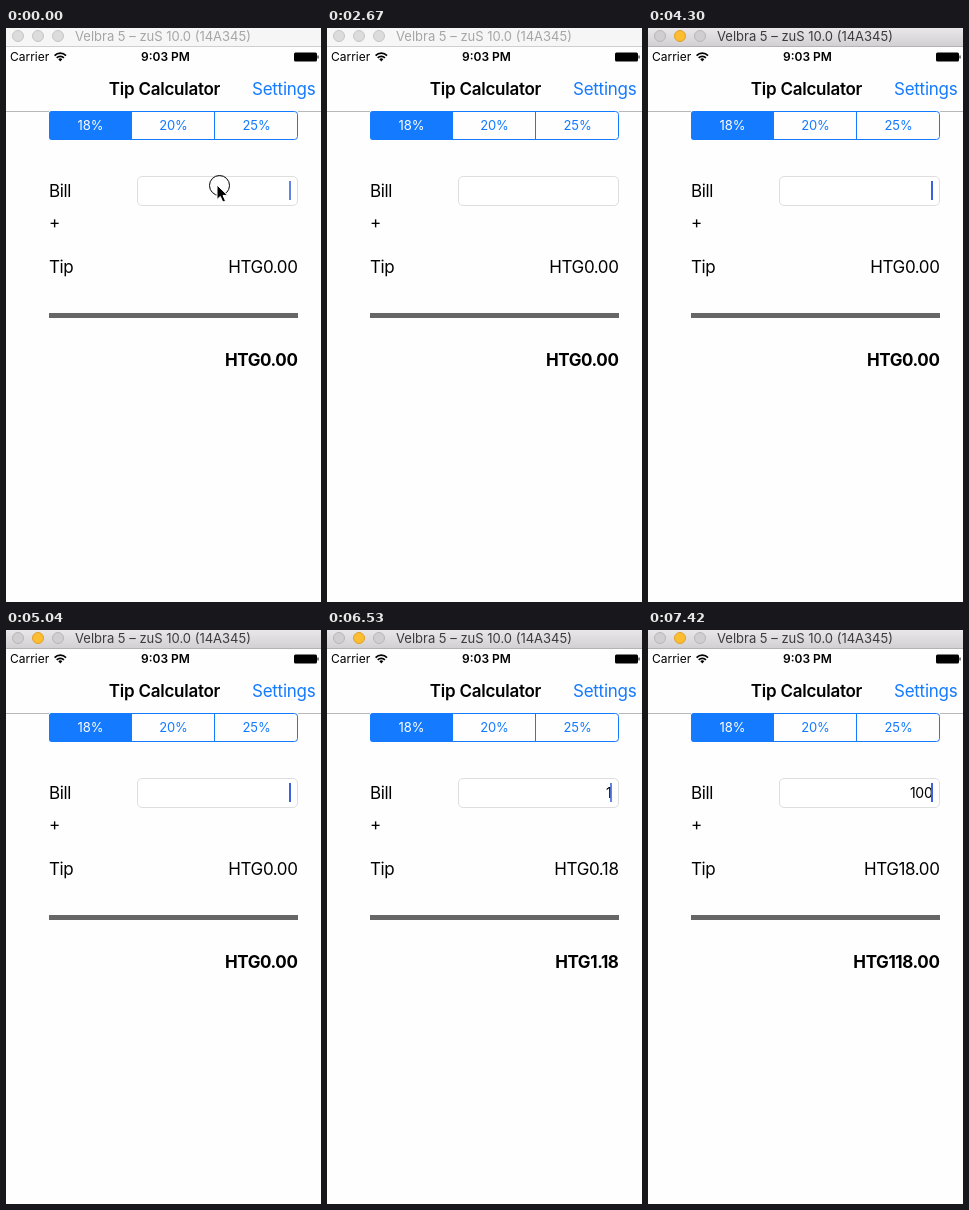
Animation of 315 by 574 pixels, one loop 8000 ms. Source, as an HTML page:

```html
<!DOCTYPE html>
<html lang="en">
<head>
<meta charset="utf-8">
<title>Tip Calculator</title>
<style>
  html, body { margin: 0; width: 100%; height: 100%; overflow: hidden; background: #fefefe; }
  svg { display: block; width: 315px; height: 574px; font: 17px Inter, sans-serif; letter-spacing: -.4px; }
  .end { text-anchor: end; }
  .mid { text-anchor: middle; }
  .bold { font-weight: 600; }
  .wide { letter-spacing: -.25px; }
  .blue { fill: #147aff; }
  .small { font-size: 13px; letter-spacing: -.1px; }
  .status { font-size: 12px; letter-spacing: 0; }
  #bar .light { fill: #dcdcdc; stroke: #c6c6c6; }
  #bar rect { fill: #f6f6f6; }
  #bar text { fill: #a6a6a6; letter-spacing: 0; }
  #bar.active rect { fill: url(#chrome); }
  #bar.active text { fill: #3c3c3c; }
  #bar.active .light { fill: #d0ced0; stroke: #b8b6b8; }
  #bar.active .amber { fill: #fdbd30; stroke: #dfa12b; }
  #bar.active path { stroke: #b4b2b4; }
</style>
</head>
<body>
<svg viewBox="0 0 315 574">
  <defs>
    <linearGradient id="chrome" x2="0" y2="1">
      <stop stop-color="#e9e7e9"/><stop offset="1" stop-color="#d2d0d2"/>
    </linearGradient>
  </defs>

  <g id="bar">
    <rect width="315" height="18"/>
    <path d="M0 18.5H315" stroke="#cfcfcf"/>
    <circle class="light" cx="12" cy="8" r="5.5"/>
    <circle class="light amber" cx="32" cy="8" r="5.5"/>
    <circle class="light" cx="52" cy="8" r="5.5"/>
    <text class="small mid" x="157" y="13">Velbra 5 – zuS 10.0 (14A345)</text>
  </g>

  <text class="status" x="4" y="33">Carrier</text>
  <g fill="none" stroke="#000" stroke-width="1.7">
    <path d="M48.6 27.6a8 8 0 0 1 11.4 0M50.7 29.9a5 5 0 0 1 7.2 0"/>
    <path d="M54.3 33.4l-2-2.1a2.8 2.8 0 0 1 4 0z" fill="#000" stroke="none"/>
  </g>
  <text class="status mid bold" x="159.5" y="33">9:03 PM</text>
  <rect x="288" y="24.5" width="23" height="9" rx="1.5"/>
  <path d="M312 27.5v3" stroke="#000"/>

  <text class="mid bold wide" x="158.5" y="67">Tip Calculator</text>
  <text class="end blue wide" x="309.5" y="67">Settings</text>

  <rect x="43.5" y="83.5" width="248" height="28" rx="3" fill="#fefefe" stroke="#147aff"/>
  <path class="blue" d="M126 83H46a3 3 0 0 0-3 3v23a3 3 0 0 0 3 3h80z"/>
  <path d="M208.5 84v28" stroke="#147aff"/>
  <path d="M0 83.5H43M292 83.5H315" stroke="#b8b8b8"/>
  <g class="small mid">
    <text x="84.5" y="102" fill="#fff">18%</text>
    <text class="blue" x="167.5" y="102">20%</text>
    <text class="blue" x="250.5" y="102">25%</text>
  </g>

  <text x="43" y="169">Bill</text>
  <text x="43" y="199.5">+</text>
  <text x="43" y="244.5">Tip</text>
  <rect x="131.5" y="148.5" width="160" height="29" rx="4.5" fill="#fff" stroke="#dedede"/>
  <text id="bill" class="end wide" x="284.5" y="168" font-size="14"></text>
  <rect id="caret" x="283" y="153" width="2" height="19" fill="#3a62de"/>
  <text id="tip" class="end" x="291.5" y="244.5"></text>
  <rect x="43" y="285" width="249" height="5" fill="#666"/>
  <text id="total" class="end" font-weight="700" x="291.5" y="337.5"></text>

  <circle id="tap" cx="213.5" cy="157.5" r="10" fill="none" stroke="#000"/>
  <path id="pointer" d="M0 0v14.5l3.3-3.1 2.5 5.7 2.7-1.2-2.5-5.5h4.7z" stroke="#fff"/>
</svg>

<script>
const LOOP = 8000;
const RATE = 0.18;
const BLINK = 1000;
const REFOCUS = 5530; // the blink restarts when the field is clicked again
const KEYS = [6530, 6680, 7120];

const el = id => document.getElementById(id);
const money = value => "HTG" + value.toFixed(2);
const clamp = value => Math.min(1, Math.max(0, value));
const ramp = (t, start, end) => clamp((t - start) / (end - start));
const [bar, bill, caret, tip, total, tap, pointer] =
  ["bar", "bill", "caret", "tip", "total", "tap", "pointer"].map(el);

function caretOpacity(t) {
  if (t >= KEYS[1]) return 1;
  const phase = (t % REFOCUS - 240) / BLINK;
  return clamp(0.55 + 3.5 * Math.cos(2 * Math.PI * phase));
}

function pointerPosition(t) {
  if (t < 590) {
    const leave = ramp(t, 150, 440);
    return [211 + 3 * leave, 157 + 11 * leave];
  }
  const enter = ramp(t, 5050, 5640);
  const back = ramp(t, 5800, 6240);
  return [252 + 8 * enter - 45 * back, 168 - 5 * enter + 2 * back];
}

function draw(t) {
  const typed = "100".slice(0, KEYS.filter(key => t >= key).length);
  const amount = Number(typed);
  const pointing = t < 590 || (t >= 5050 && t < KEYS[0]);

  bar.classList.toggle("active", t >= 4300);
  bill.textContent = typed;
  tip.textContent = money(amount * RATE);
  total.textContent = money(amount * (1 + RATE));
  caret.setAttribute("opacity", caretOpacity(t));
  tap.setAttribute("opacity", t < 150 ? 1 : 0);
  pointer.setAttribute("opacity", pointing ? 1 : 0);
  pointer.setAttribute("transform", `translate(${pointerPosition(t)})`);
}

const begin = performance.now();
function tick() {
  draw((performance.now() - begin) % LOOP);
  requestAnimationFrame(tick);
}
tick();
</script>
</body>
</html>
```
